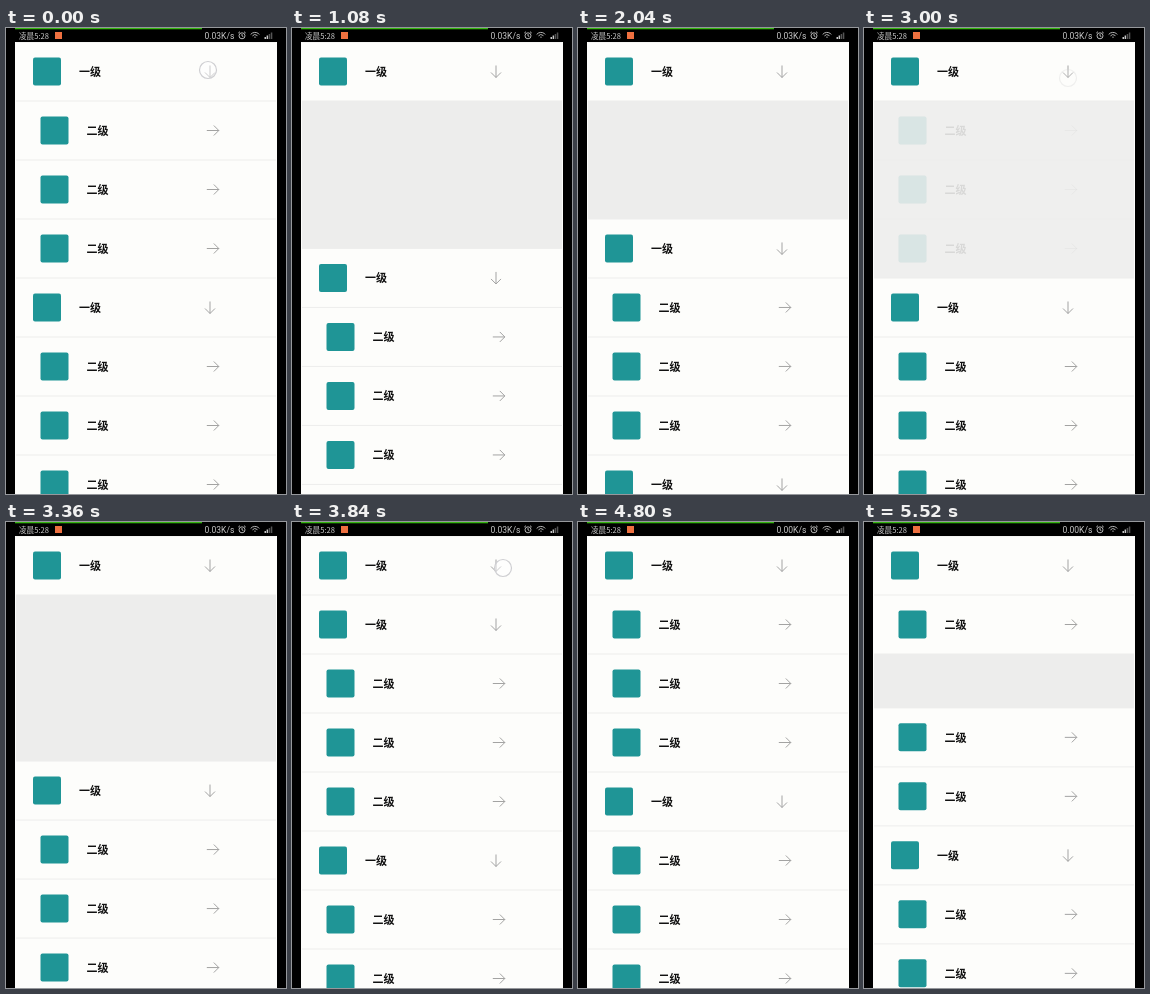
Recreate the animation shown at these times as an HTML page with a canvas. Size 280x466 px, loop 5640 ms.

```html
<!DOCTYPE html>
<html lang="zh-CN">
<head>
<meta charset="utf-8">
<title>Expandable list</title>
<style>
  html, body { margin: 0; width: 100%; height: 100%; overflow: hidden; background: #000; }
  canvas { display: block; width: 280px; height: 466px; }
</style>
</head>
<body>
<canvas id="stage"></canvas>
<script>
const LOOP = 5640, STEP = 120, ROW = 59, TOP = 14.5;
const MOVE = 250, FADE = 120;
const PAPER = '#fdfdfb', GAP = '#ededec';
const CJK = '"Noto Sans CJK SC", "Noto Sans CJK", sans-serif';

const canvas = document.getElementById('stage');
const ctx = canvas.getContext('2d');
const dpr = window.devicePixelRatio || 1;
canvas.width = 280 * dpr;
canvas.height = 466 * dpr;
ctx.scale(dpr, dpr);

// Taps: release time, how long the finger was down, position
const headTaps = [
  [470, 600, 202, 42], [897, 130, 204, 44], [1390, 130, 204, 45], [1888, 130, 203, 44],
  [2310, 130, 204, 47], [2738, 130, 204, 47], [3200, 230, 204, 50], [3850, 130, 211, 46]
];
const childTaps = [[4870, 60, 207, 104], [5243, 130, 207, 104]];

const clamp = v => Math.max(0, Math.min(1, v));
const ease = v => (1 - Math.cos(Math.PI * clamp(v))) / 2;

// Each tap flips the section: opening moves then fades in, closing fades out then moves
function section(t, taps, startsOpen) {
  let open = startsOpen, since = Infinity;
  for (const [at] of taps) {
    if (at > t) break;
    open = !open;
    since = t - at;
  }
  return open
    ? { size: ease(since / MOVE), alpha: clamp((since - MOVE) / FADE) }
    : { size: 1 - ease((since - FADE) / MOVE), alpha: 1 - clamp(since / FADE) };
}

function rect(color, x, y, w, h) {
  ctx.fillStyle = color;
  ctx.fillRect(x, y, w, h);
}

function line(...points) {
  ctx.beginPath();
  points.forEach(([x, y], i) => i ? ctx.lineTo(x, y) : ctx.moveTo(x, y));
  ctx.stroke();
}

function text(str, x, y, font, color) {
  ctx.font = font;
  ctx.fillStyle = color;
  ctx.fillText(str, x, y);
}

function arrow(x, y, down) {
  ctx.save();
  ctx.translate(x, y);
  if (down) ctx.rotate(Math.PI / 2);
  ctx.strokeStyle = '#999';
  ctx.lineWidth = 0.9;
  line([-6, 0], [6, 0]);
  line([1, -5], [6, 0], [1, 5]);
  ctx.restore();
}

function row(level, y, alpha = 1) {
  if (alpha <= 0 || y > 466) return;
  const shift = level * 7.5, mid = y + 29;
  ctx.globalAlpha = alpha;
  rect(PAPER, 9, y, 262, ROW - 1);
  ctx.fillStyle = '#1f9596';
  ctx.beginPath();
  ctx.roundRect(27 + shift, mid - 14, 28, 28, 2);
  ctx.fill();
  text('一二三'[level] + '级', 73 + shift, mid + 4.5, 'bold 11px ' + CJK, '#111');
  arrow(204 + level * 2.8, mid, level === 0);
  ctx.globalAlpha = 1;
}

function list(t) {
  const head = section(t, headTaps, true);
  const sub = section(t, childTaps, false);
  const subShift = 3 * ROW * sub.size;
  const at = i => TOP + ROW * i;

  rect(PAPER, 9, 14, 262, 452);
  rect(GAP, 10, 14, 260, 452);
  row(0, at(0));
  for (let i = 2; i < 5; i++) row(2, at(i), sub.alpha);
  for (let i = 1; i < 4; i++) row(1, at(i) + (i > 1 ? subShift : 0), head.alpha);
  const rest = at(1) + 3 * ROW * head.size + subShift;
  for (let i = 0; i < 8; i++) row(i % 4 ? 1 : 0, rest + ROW * i);
}

function touches(t) {
  for (const [up, held, x, y] of [...headTaps, ...childTaps]) {
    const alpha = Math.min(clamp((t - up + held) / 100), 1 - clamp((t - up) / 120));
    if (alpha <= 0) continue;
    ctx.globalAlpha = alpha;
    ctx.beginPath();
    ctx.arc(x, y, 8.5, 0, 7);
    ctx.fillStyle = 'rgba(255,255,255,.45)';
    ctx.fill();
    ctx.strokeStyle = '#cfcfd2';
    ctx.lineWidth = 1.2;
    ctx.stroke();
    ctx.globalAlpha = 1;
  }
}

function statusBar(t) {
  const ink = '#c8c8c8';
  rect('#000', 0, 0, 280, 14);
  rect('#35b510', 9, 0, 187, 1.3);
  text('凌晨5:28', 13, 10.5, '7.6px ' + CJK, ink);
  rect('#ee7040', 49, 4, 7, 7);
  text(t < 4680 ? '0.03K/s' : '0.00K/s', 198.5, 10.7, '8.5px Roboto, sans-serif', ink);

  ctx.strokeStyle = ink;
  ctx.lineWidth = 0.9;
  // Alarm clock
  ctx.beginPath();
  ctx.arc(236, 7.8, 3, 0, 7);
  ctx.stroke();
  line([236, 6], [236, 8], [237.3, 8.5]);
  line([232.3, 5], [234, 3.7]);
  line([239.7, 5], [238, 3.7]);
  // Wireless
  for (const r of [1, 3.3, 5.6]) {
    ctx.beginPath();
    ctx.arc(249, 10, r, -Math.PI * 0.78, -Math.PI * 0.22);
    ctx.stroke();
  }
  // Signal
  for (let i = 0; i < 4; i++)
    rect(i < 2 ? ink : '#555', 258.5 + i * 2.1, 9 - i * 1.5, 1.5, 2 + i * 1.5);
}

function frame(now) {
  const t = Math.floor((now % LOOP) / STEP) * STEP;
  rect('#000', 0, 0, 280, 466);
  list(t);
  touches(t);
  statusBar(t);
  requestAnimationFrame(frame);
}
requestAnimationFrame(frame);
</script>
</body>
</html>
```
